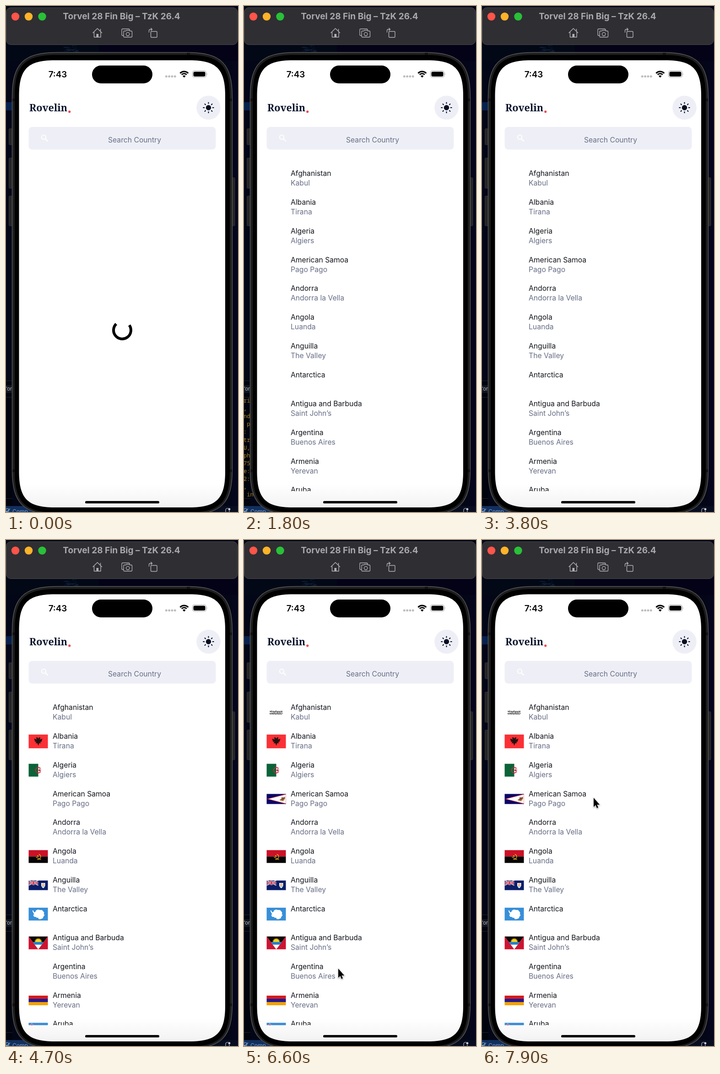
Animation of 507 by 1105 pixels, one loop 8000 ms. Source, as an HTML page with a canvas:

```html
<!DOCTYPE html>
<html lang="en">
<head>
<meta charset="utf-8">
<title>Country list</title>
<style>
html, body { margin: 0; width: 100%; height: 100%; overflow: hidden; background: #03061a; }
canvas { display: block; width: 507px; height: 1105px; }
</style>
</head>
<body>
<canvas id="stage"></canvas>
<script>
const W = 507, H = 1105, LOOP = 8000;
const SANS = 'Inter, sans-serif';
const canvas = document.getElementById('stage');
const c = canvas.getContext('2d');
const dpr = window.devicePixelRatio || 1;
canvas.width = W * dpr;
canvas.height = H * dpr;

function box(x, y, w, h, fill) {
  c.fillStyle = fill;
  c.fillRect(x, y, w, h);
}
function paint(path, fill, stroke, lw = 1) {
  if (fill) { c.fillStyle = fill; c.fill(path); }
  if (stroke) { c.strokeStyle = stroke; c.lineWidth = lw; c.stroke(path); }
}
function shape(d, fill, stroke, lw) {
  paint(new Path2D(d), fill, stroke, lw);
}
function round(x, y, w, h, r, fill, stroke, lw) {
  const p = new Path2D();
  p.roundRect(x, y, w, h, r);
  paint(p, fill, stroke, lw);
}
// Rounded box whose corners ease into the straight sides.
function smoothBox(x, y, w, h, r) {
  const e = 1.35 * r, k = 0.331 * r, X = x + w, Y = y + h;
  const p = new Path2D();
  p.moveTo(x + e, y);
  p.lineTo(X - e, y);
  p.bezierCurveTo(X - k, y, X, y + k, X, y + e);
  p.lineTo(X, Y - e);
  p.bezierCurveTo(X, Y - k, X - k, Y, X - e, Y);
  p.lineTo(x + e, Y);
  p.bezierCurveTo(x + k, Y, x, Y - k, x, Y - e);
  p.lineTo(x, y + e);
  p.bezierCurveTo(x, y + k, x + k, y, x + e, y);
  p.closePath();
  return p;
}
function dot(x, y, r, fill) {
  c.beginPath();
  c.arc(x, y, r, 0, 7);
  c.fillStyle = fill;
  c.fill();
}
function arc(x, y, r, from, to, color, lw) {
  c.beginPath();
  c.arc(x, y, r, from, to);
  c.strokeStyle = color;
  c.lineWidth = lw;
  c.stroke();
}
function text(s, x, y, font, fill, align = 'left') {
  c.font = font;
  c.fillStyle = fill;
  c.textAlign = align;
  c.fillText(s, x, y);
}
function seeded(seed) {
  return () => (seed = seed * 16807 % 2147483647) / 2147483647;
}

// Flags are 42 wide, drawn from the left edge and centred on y = 0.
const flags = {
  afghanistan() {
    const rnd = seeded(715517);
    c.strokeStyle = 'rgba(20,20,20,.8)';
    c.lineWidth = 0.7;
    for (let i = 0; i < 80; i++) {
      const x = 6.5 + i % 40 * 0.7, y = (i < 40 ? -2.5 : 2) + rnd() * 2 - 1;
      c.beginPath();
      c.moveTo(x, y - 2 * rnd());
      c.quadraticCurveTo(x + 2 * rnd(), y + 2, x + 2.5 * rnd(), y + 2 * rnd());
      c.stroke();
    }
  },
  albania() {
    box(0, -15, 42, 30, '#fb3035');
    shape('M21-6 L19-9 16-8 17-6 18-4 12-6 14 1 17 1 15 4 19 4 21 9.500 23 4 27 4 25 1 28 1 30-6 24-4 25-6 26-8 23-9Z', '#25100f');
  },
  algeria() {
    box(0, -14, 21, 28, '#0b6338');
    arc(21, 0, 6, 0.6, 5.68, '#d0213c', 1.7);
    shape('M20 0 L23-1 24-4 25-1 28-1 25.5 1 26 4 23.5 2Z', '#d0213c');
  },
  samoa() {
    box(0, -11, 42, 22, '#0b0766');
    shape('M0 0 L42-11 V11Z', '#c3283c');
    shape('M4 0 L42-9.7 V9.7Z', '#fff');
    shape('M40-5 L36-3 33-4 32 0 28 2 32 3 35 5 37 2 40 0Z', '#87502d');
    shape('M29 3 L37 4 M35 5 L39 2', null, '#d8a13b', 1.2);
  },
  angola() {
    box(0, -14, 42, 14, '#cb1227');
    box(0, 0, 42, 14, '#080404');
    arc(20.5, 0.5, 5.8, -1.3, 1.9, '#eebd2e', 1.2);
    shape('M16 1 L27 7', null, '#eebd2e', 1.4);
    dot(20, -1, 1.5, '#eebd2e');
  },
  anguilla() {
    box(0, -10.5, 42, 21, '#0b1d68');
    shape('M0-10.5 L21 0 M21-10.5 L0 0', null, '#fff', 2.2);
    shape('M0-10.5 L21 0 M21-10.5 L0 0', null, '#c8203a', 0.8);
    shape('M10.5-10.5 V0 M0-5.2 H21', null, '#fff', 3.4);
    shape('M10.5-10.5 V0 M0-5.2 H21', null, '#c8203a', 1.9);
    shape('M27.5-5 H36 V1 Q35 5 31.8 6.5 Q28.5 5 27.5 1Z', '#fff');
    box(28.4, 1.5, 6.8, 1.8, '#7cc7d8');
    arc(31.8, -1.2, 1.9, 0, 7, '#e98a2c', 1.3);
  },
  antarctica() {
    box(0, -14, 42, 28, '#388fd8');
    shape('M8-8 L10-8 12-4 15-5 16-8 20-10 25-9 29-9 32-6 34-3 33 0 35 2 32 6 31 9 26 11 22 11 21 8 18 8 15 6 12 6 10 2 12 0 10-3Z', '#fff');
  },
  antigua() {
    box(0, -14, 42, 28, '#ce1430');
    c.save();
    c.clip(new Path2D('M0-14 H42 L21 14Z'));
    box(0, -14, 42, 28, '#fff');
    box(0, -14, 42, 14, '#0a0808');
    c.translate(21, -2);
    c.fillStyle = '#fbd21c';
    c.beginPath();
    for (let i = 0; i < 32; i++) {
      const a = i * Math.PI / 16, r = i % 2 ? 6 : 9;
      c.lineTo(r * Math.cos(a), r * Math.sin(a));
    }
    c.fill();
    c.translate(-21, 2);
    box(0, -2, 42, 6, '#2080cc');
    box(0, 4, 42, 10, '#fff');
    c.restore();
  },
  armenia() {
    box(0, -10.5, 42, 7, '#d61a1c');
    box(0, -3.5, 42, 7, '#1b1b95');
    box(0, 3.5, 42, 7, '#f4a100');
  },
  aruba() {
    box(0, -14, 42, 28, '#3a8dd8');
    shape('M7-13 L8-10 11-9 8-8 7-5 6-8 3-9 6-10Z', '#d8213b', '#fff', 0.6);
  }
};

// name, capital, flag, time the flag shows
const rows = [
  ['Afghanistan', 'Kabul', 'afghanistan', 5000],
  ['Albania', 'Tirana', 'albania', 4200],
  ['Algeria', 'Algiers', 'algeria', 4200],
  ['American Samoa', 'Pago Pago', 'samoa', 5300],
  ['Andorra', 'Andorra la Vella'],
  ['Angola', 'Luanda', 'angola', 4300],
  ['Anguilla', 'The Valley', 'anguilla', 4400],
  ['Antarctica', '', 'antarctica', 4300],
  ['Antigua and Barbuda', 'Saint John’s', 'antigua', 4400],
  ['Argentina', 'Buenos Aires'],
  ['Armenia', 'Yerevan', 'armenia', 4300],
  ['Aruba', 'Oranjestad', 'aruba', 4400]
];
const log = ['ri', ',', 'nd', ' p', ':', 'tr', 'U,', 'ph', '75', 'e:', '2:', ',', ' in'];

function drawLog(t) {
  if (t < 900 || t >= 2600) return;
  const step = t < 1500 ? Math.min(2, Math.floor((t - 900) / 100)) - 6
                        : Math.min(5, Math.floor((t - 1500) / 100)) - 3;
  // The scroll has come to rest on the listed order by 1800 ms.
  const shift = Math.min(0, step) * 4 + log.length * 4;
  for (let i = 0; i < log.length; i++) {
    text(log[(i + shift) % log.length], -1, 866 + i * 17.1, '12px "Noto Sans Mono", monospace', '#a98427');
  }
}

function drawDesktop(t) {
  box(0, 0, W, H, '#030617');
  box(0, 0, 203, 120, '#020815');
  box(203, 0, 304, 120, '#040217');
  box(494, 120, 13, 985, '#05051c');
  const rnd = seeded(90210);
  for (let i = 0; i < 22; i++) {
    box(125 + rnd() * 28, 86 + rnd() * 14, 2 + rnd() * 9, 0.6, i % 3 ? '#0c2850' : '#233f5c');
  }
  box(0, 210, 14, 18, '#08214d');
  box(0, 818, 14, 287, '#02040d');
  box(0, 818, 14, 1, '#1a2233');
  box(0, 828, 14, 17, '#11151f');
  text('Tor', -4, 840, '11px ' + SANS, '#b5bac4');
  box(0, 854, 14, 1, '#1a2233');
  drawLog(t);
  box(0, 1075, 14, 1, '#1a2233');
  box(0, 1092, 80, 13, '#12305d');
  box(430, 1092, 77, 13, '#080d20');
  text('Comp', 14, 1108, '12px ' + SANS, '#7f9cc4');
  arc(3, 1101, 3.5, 0, 7, '#8aa5ca', 1.2);
  shape('M0 1105 L9 1098', null, '#8aa5ca', 1.2);
  shape('M480 1105 V1101 Q480 1097 484 1097 H486 M488 1105 V1102', null, '#b9bec8', 1.2);
  dot(488, 1099, 2.4, '#c9ced6');
}

function drawToolbar() {
  round(0.5, 3.5, 505.5, 81, 10, '#2f2e32', '#48474b');
  dot(20.5, 23, 8.7, '#ff5449');
  dot(49.5, 23, 8.7, '#fdb32a');
  dot(79, 23, 8.7, '#28c138');
  text('Torvel 28 Fin Big – TzK 26.4', 252.5, 29, 'bold 19px ' + SANS, '#a9a8ac', 'center');
  const ink = '#b3b2b6';
  c.lineJoin = 'round';
  shape('M189.5 59 L199.7 49 210 59 M192.5 57 V68 H207 V57 M206.5 55 V50', null, ink, 1.4);
  box(197.5, 61, 4.6, 7, ink);
  shape('M257 64.5 H255 Q253 64.5 253 62.5 V52 Q253 50 255 50 H268 Q270 50 270.5 53', null, ink, 1.3);
  shape('M259 54.5 H262 L263.5 53 H269 L270.5 54.5 H273.5 Q275.5 54.5 275.5 56.5 V66 Q275.5 68 273.5 68 H259 Q257 68 257 66 V56.5 Q257 54.5 259 54.5Z', '#2f2e32', ink, 1.3);
  arc(266.2, 61.3, 3.7, 0, 7, ink, 1.3);
  round(316.5, 55.5, 13.5, 13, 1.5, null, ink, 1.4);
  shape('M312.5 58 V54 Q312.5 51 315.5 51 H319 M316.5 48 L319.5 51 316.5 54', null, ink, 1.3);
  c.lineJoin = 'miter';
}

const glass = smoothBox(28.5, 118.5, 450.5, 976.5, 57.6);

function drawPhone() {
  for (const [y, h] of [[268, 35], [332, 66], [415, 65]]) round(6.5, y, 10, h, 1.5, '#252525', '#343434');
  round(489, 375, 11, 105, 1.5, '#252525', '#343434');
  paint(smoothBox(13.5, 101.5, 481, 1009, 73), '#1d1d1d', '#5b5b5b', 1.4);
  box(395, 102, 7, 5, '#111');
  for (const y of [202, 1012]) {
    box(14, y, 5, 6, '#111');
    box(489, y, 5, 6, '#111');
  }
  paint(smoothBox(19, 107, 470, 999, 67), '#000');
  paint(glass, '#fff');
}

function drawStatus() {
  text('7:43', 113, 155.5, '600 18.8px ' + SANS, '#000', 'center');
  round(188, 130, 132, 39, 19.5, '#000');
  for (let i = 0; i < 4; i++) round(348 + i * 6.3, 151.5, 4.7, 4.5, 1.6, '#bdbdbd');
  arc(389.3, 155, 12, -2.4, -0.74, '#000', 3);
  arc(389.3, 155, 7.4, -2.4, -0.74, '#000', 2.9);
  shape('M389.3 156.5 L386 152.8 Q389.3 150.2 392.6 152.8Z', '#000');
  round(407.5, 141.5, 30, 14.5, 4.5, null, '#a6a6a6', 1.2);
  round(409.5, 143.5, 26, 10.5, 3, '#000');
  shape('M438.8 146.5 Q440.8 148.7 438.8 151Z', '#a6a6a6');
}

function drawHeader() {
  text('Rovelin', 51, 229.5, 'bold 21.5px "Noto Serif", serif', '#07122b');
  dot(138.7, 230.8, 2.6, '#f0484e');
  dot(442.5, 222, 26.3, '#eeeff6');
  dot(442.5, 222, 5.7, '#060d22');
  c.lineCap = 'round';
  for (let i = 0; i < 8; i++) {
    const x = Math.cos(i * Math.PI / 4), y = Math.sin(i * Math.PI / 4);
    c.beginPath();
    c.moveTo(442.5 + 9.2 * x, 222 + 9.2 * y);
    c.lineTo(442.5 + 11.3 * x, 222 + 11.3 * y);
    c.strokeStyle = '#060d22';
    c.lineWidth = 2;
    c.stroke();
  }
  c.lineCap = 'butt';
  round(49.5, 264, 409, 49.5, 8, '#eeeff6');
  arc(82.5, 286.5, 4.6, 0, 7, '#fff', 1.8);
  shape('M85.8 289.8 L91.5 295.5', null, '#fff', 2.2);
  text('Search Country', 281, 297.5, '15.7px ' + SANS, '#666d85', 'center');
}

function drawList(t) {
  c.save();
  c.beginPath();
  c.rect(29, 330, 450, 729.5);
  c.clip();
  rows.forEach(([name, capital, flag, at], i) => {
    const y = 62.85 * i;
    text(name, 102, 371 + y, '15.7px ' + SANS, '#11131a');
    text(capital, 102, 392 + y, '15.7px ' + SANS, '#666d85');
    if (flag && t >= at) {
      c.save();
      c.translate(49.5, 377 + y);
      flags[flag]();
      c.restore();
    }
  });
  c.restore();
}

function drawBottom() {
  c.save();
  c.clip(glass);
  const g = c.createLinearGradient(0, 1045, 0, 1095);
  g.addColorStop(0, 'rgba(0,0,0,0)');
  g.addColorStop(1, 'rgba(0,0,0,.05)');
  box(28, 1045, 452, 50, g);
  c.restore();
  round(173, 1081, 162, 5.3, 2.6, '#000');
}

function drawCursor(t) {
  if (t < 6300) return;
  const ease = u => u * u * (3 - 2 * u);
  const a = ease(Math.min(1, (t - 6300) / 300));
  const b = ease(Math.min(1, Math.max(0, (t - 6700) / 900)));
  const arrow = 'M0 0 V21.5 L4.6 17.3 7.6 24.2 10.8 22.8 7.9 16.1 H14.2Z';
  c.save();
  c.translate(176 + 30 * a + 38 * b, 1105 - 169 * a - 373 * b);
  c.scale(0.93, 0.93);
  c.shadowColor = 'rgba(0,0,0,.35)';
  c.shadowBlur = 3 * dpr;
  c.shadowOffsetY = dpr;
  shape(arrow, '#fff', '#fff', 1.8);
  c.shadowColor = 'transparent';
  shape(arrow, '#000');
  c.restore();
}

function draw(t) {
  c.setTransform(dpr, 0, 0, dpr, 0, 0);
  drawDesktop(t);
  drawToolbar();
  drawPhone();
  drawStatus();
  drawHeader();
  if (t < 500) {
    const turn = t < 100 ? 0 : 0.25;
    arc(254, 708, 19, turn - 0.62, turn + 3.95, '#000', 6);
  } else {
    drawList(t);
  }
  drawBottom();
  drawCursor(t);
}

const start = performance.now();
function tick() {
  draw((performance.now() - start) % LOOP);
  requestAnimationFrame(tick);
}
tick();
</script>
</body>
</html>
```
